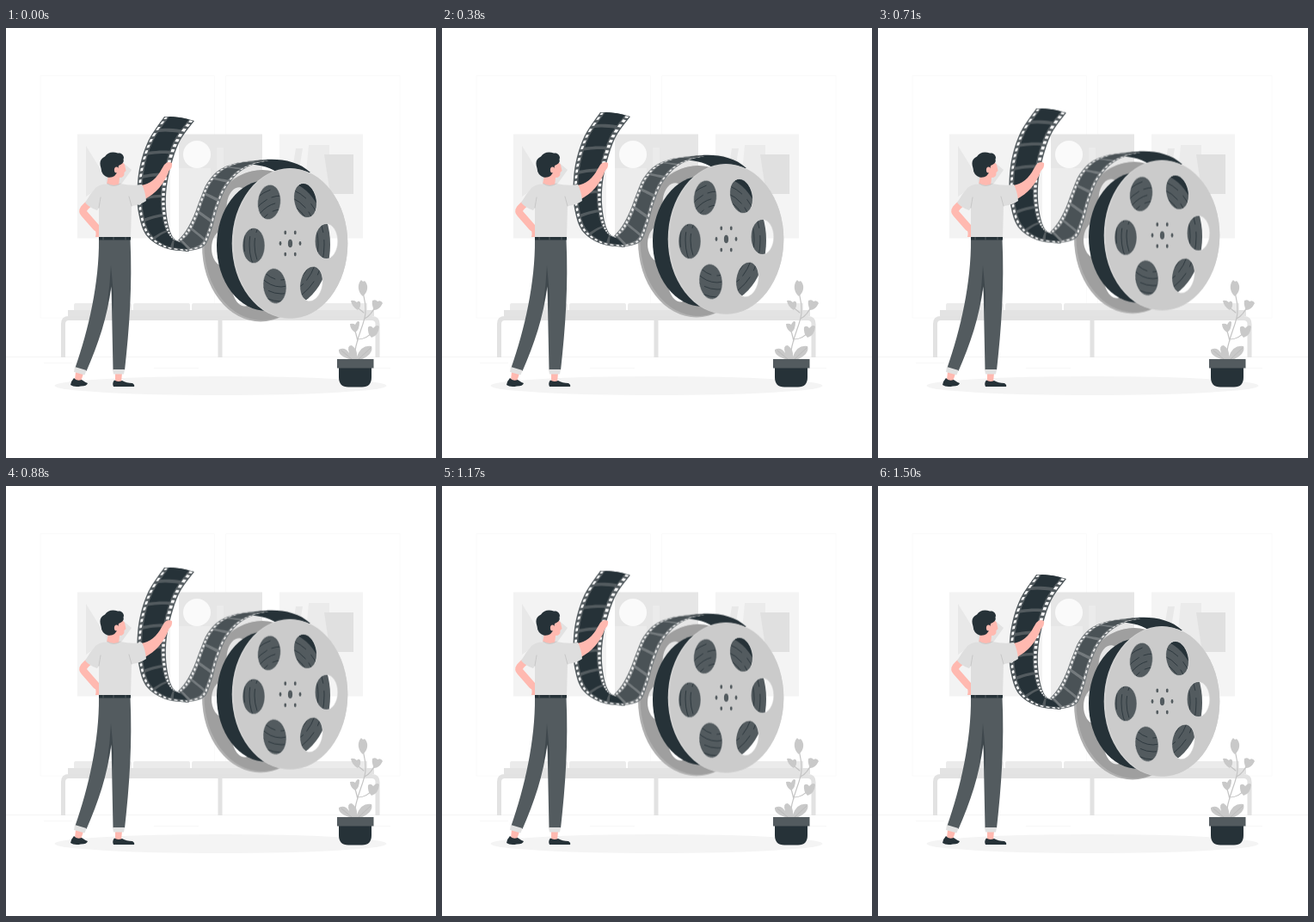
Animation, 500 px wide and 500 px high, one loop 1.54 s. Source, as an HTML page:

```html
<!DOCTYPE html>
<html lang="en">
<head>
<meta charset="utf-8">
<title>Film reel</title>
<style>
  html, body { margin: 0; width: 100%; height: 100%; overflow: hidden; background: #fff; }
  svg { display: block; width: 100vw; height: 100vh; }
  .float { animation: float 1540ms linear infinite; }
  @keyframes float {
    0%, 97.4%, 100% { transform: translateY(0); }
    48.7% { transform: translateY(-10px); }
  }
  .dark { fill: #263238; }
  .slate { fill: #535b5f; }
  .skin { fill: #ffb9b0; }
  .line { fill: none; stroke-linecap: round; stroke-linejoin: round; }
</style>
</head>
<body>
<svg viewBox="0 0 500 500">
  <defs>
    <g id="holes">
      <ellipse cx="306" cy="202.500" rx="13.300" ry="20.300" transform="rotate(6 306 202.5)"/>
      <ellipse cx="348" cy="200.500" rx="13" ry="20.300" transform="rotate(-12 348 200.5)"/>
      <ellipse cx="288" cy="253" rx="13" ry="20.500"/>
      <ellipse cx="372.500" cy="248" rx="13.300" ry="20.500"/>
      <ellipse cx="312.500" cy="300" rx="13.500" ry="20.500" transform="rotate(-6 312.5 300)"/>
      <ellipse cx="355" cy="297.500" rx="13" ry="20.500" transform="rotate(10 355 297.5)"/>
    </g>
    <mask id="backCut">
      <rect width="500" height="500" fill="#fff"/>
      <use href="#holes" x="-36" y="3"/>
    </mask>
    <mask id="frontCut">
      <rect width="500" height="500" fill="#fff"/>
      <use href="#holes"/>
    </mask>
    <mask id="inHoles"><use href="#holes" fill="#fff"/></mask>
  </defs>

  <!-- room -->
  <g fill="none" stroke="#fafafa">
    <path d="M40 55.500H242.500V337H40ZM255.500 55.500H458V337H255.500Z"/>
    <path d="M0 382.500H500" stroke="#f5f5f5"/>
    <path d="M172 395.500H224M44 389.500H77M425 395.500H447" stroke="#f7f7f7"/>
  </g>

  <!-- pictures -->
  <path d="M83 123.500H191V244.500H83Z" fill="#f3f3f3"/>
  <path d="M93 137L119 179L93 196Z" fill="#e8e8e8"/>
  <path d="M113 165L126 148L146 165L133 183L117 181Z" fill="#e2e2e2"/>
  <path d="M201 123.500H298V244.500H201Z" fill="#e6e6e6"/>
  <path d="M201 163H238V244.500H201Z" fill="#ececec"/>
  <path d="M245 139H253V244H245Z" fill="#ebebeb"/>
  <circle cx="222" cy="147" r="16" fill="#fafafa"/>
  <path d="M318 123.500H415V244.500H318Z" fill="#f4f4f4"/>
  <path d="M337 140H345L339 176H331Z" fill="#e8e8e8"/>
  <path d="M352 136H376V200H346Z" fill="#ebebeb"/>
  <path d="M370 147H404V193H377Z" fill="#e0e0e0"/>

  <!-- bench -->
  <path d="M79 328.500V322q0-2 2-2H144q2 0 2 2V328.500ZM148 328.500V322q0-2 2-2H212q2 0 2 2V328.500ZM216 328.500V322q0-2 2-2H420V328.500Z" fill="#ebebeb"/>
  <path d="M72 328H428V335H72Z" fill="#e3e3e3"/>
  <path class="line" d="M66.500 383V344q0-6.500 6.500-6.500H425q7 0 7 6.500V383M249 338V383" stroke="#e2e2e2" stroke-width="5" style="stroke-linecap:butt"/>

  <ellipse cx="249.500" cy="416" rx="193" ry="11" fill="#f4f4f4"/>

  <!-- plant -->
  <g fill="#c9c9c9">
    <path class="line" d="M405 385C405 363 417 346 418 331S415 312 414 302M409 362Q420 362 427 352M417 338Q425 334 430 322M416 331Q411 327 406 323M409 364Q407 356 405 348" stroke="#c4c4c4" stroke-width="1.200"/>
    <path d="M413 293C408 298 409 307 415 312C421 307 422 299 417 294Q415 296 413 293Z"/>
    <path d="M401 317Q405 316 408 319Q410 316 412 319Q413 325 409 328Q402 324 401 317Z"/>
    <path d="M426 317Q430 315 432 318Q436 316 438 320Q434 328 428 328Q425 322 426 317Z"/>
    <path d="M400 344Q404 343 406 345Q409 339 411 342Q411 351 406 354Q400 350 400 344Z"/>
    <path d="M421 348Q424 345 427 349Q431 344 434 347Q433 358 425 360Q420 355 421 348Z"/>
    <path d="M403 386Q386 382 387 374Q394 370 399 378Q396 369 402 369Q409 374 408 382Q413 368 425 370Q428 379 412 386Z"/>
    <path class="line" d="M390 375L402 385M424 372L410 385" stroke="#b5b5b5" stroke-width=".7"/>
  </g>
  <path class="dark" d="M387 394H425V406Q425 417.500 414 417.500H398Q387 417.500 387 406Z"/>
  <path class="slate" d="M385 385H427.500V395.500H385Z"/>

  <!-- film and reel -->
  <g class="float">
    <g mask="url(#backCut)">
      <ellipse cx="296" cy="253.500" rx="68" ry="88" fill="#b0b0b0"/>
      <ellipse cx="298" cy="252.500" rx="67.500" ry="87.500" fill="#9f9f9f"/>
    </g>
    <path class="dark" d="M303 177A58 76 0 0 0 303 329H328V177Z"/>
    <path class="dark" d="M278 158C296 151 333 148 354 168L318 170Q306 159 278 158Z"/>
    <g id="film"></g>
    <g mask="url(#inHoles)">
      <ellipse cx="320" cy="252" rx="57" ry="75" class="slate"/>
      <g class="line" stroke="#263238" stroke-width=".8">
        <ellipse cx="320" cy="252" rx="50" ry="66" stroke-dasharray="36 9"/>
        <ellipse cx="320" cy="252" rx="43" ry="57" stroke-dasharray="19 6"/>
        <ellipse cx="320" cy="252" rx="37" ry="49" stroke-dasharray="43 8"/>
        <ellipse cx="320" cy="252" rx="31" ry="41" stroke-dasharray="25 7"/>
      </g>
      <path class="dark" d="M334 170H366V214Q355 188 334 180Z"/>
    </g>
    <g mask="url(#frontCut)">
      <ellipse cx="330" cy="250.500" rx="67.300" ry="87.500" fill="#d2d2d2"/>
      <ellipse cx="331" cy="250.500" rx="66.300" ry="87" fill="#cbcbcb"/>
    </g>
    <use href="#holes" fill="none" stroke="#d2d2d2" stroke-width=".6"/>
    <g class="slate">
      <ellipse cx="330.500" cy="250.500" rx="2.600" ry="4.800"/>
      <g id="bolts"></g>
    </g>
  </g>

  <!-- person -->
  <path class="line" d="M99 202C92 208 87 212 91 216Q98 224 105 232" stroke="#ffb9b0" stroke-width="8.500"/>
  <path class="skin" d="M101 226Q110 229 110 236L108 243H104Q106 236 101 232Z"/>
  <path class="skin" d="M157 183C167 182 176 174 181 164L184 159Q188 154 193 157Q194 162 189.500 166C184 181 175 192 160 200Z"/>
  <path class="skin" d="M127 157Q135 153 138 159L139.500 166L137.500 168Q138 174 132 174L131 184Q123 188 117 182L120 166Z"/>
  <path class="dark" d="M110.500 163Q107 153 115 149.500Q120 142.500 130 145.500Q138 146 136.500 153Q138 157 131 160L130 166Q127 175 118 173.500Q111 171 110.500 163Z"/>
  <path class="line" d="M130 146.500Q135 144 136.500 151" stroke="#263238" stroke-width="1"/>
  <ellipse class="skin" cx="128.500" cy="165" rx="2.600" ry="3.500"/>
  <path d="M118 181Q108 182 104 186Q97 194 92 203Q97 209 106 212L108 209V243.500H145L146 207Q156 206 163 201Q162 190 158 182Q146 184 133 181Q126 185 118 181Z" fill="#dedede"/>
  <path class="line" d="M118 181Q125 186 133 181M108 209L110 197M146 207L143 196" stroke="#c4c4c4" stroke-width=".9"/>
  <path class="slate" d="M108 246H144.500C147 298 143.500 350 138 398H124.500L122.500 300C118 336 107 368 93.500 399L80.500 395C96 351 108.500 296 108 246Z"/>
  <path d="M122 276L125 310L124.500 330L122.500 300L117.500 322Q121 298 122 276Z" fill="#3f484d"/>
  <path class="dark" d="M108 243H145V246.500H108Z"/>
  <path d="M113 243V246.500M125 243V246.500M139 243V246.500" stroke="#535b5f"/>
  <path class="skin" d="M81 400L90 402L87 411L80 409ZM127 401H135L134 412H127Z"/>
  <path d="M80 394L93.500 398L91.500 403.500L79 400ZM124 397H138L137 402.500H125Z" fill="#e1e1e1"/>
  <path class="dark" d="M79 407Q82 411 88 409Q92 412 95 413Q94 416.500 87 416.500Q79 418 75 415Q76 410 79 407ZM126 409.500Q130 412 135 410Q140 413 147 413Q150 415 149 417H125Q123 413 126 409.500Z"/>
</svg>

<script>
  const $ = id => document.getElementById(id);

  // Smooth curve through evenly spaced points, u from 0 to 1
  const curve = pts => u => {
    const n = pts.length - 1;
    const i = Math.min(n - 1, Math.floor(u * n)), t = u * n - i;
    const at = k => pts[Math.max(0, Math.min(n, k))];
    return [0, 1].map(c => {
      const [a, b, d, e] = [at(i - 1)[c], at(i)[c], at(i + 1)[c], at(i + 2)[c]];
      return b + t / 2 * (d - a + t * (2 * a - 5 * b + 4 * d - e + t * (3 * (b - d) + e - a)));
    });
  };

  // Patch of the ribbon between two edges; bow lifts its middle
  function patch(left, right, bow, u0, u1, v0, v1) {
    const point = (u, v) => {
      const a = left(u), b = right(u);
      const x = a[0] + (b[0] - a[0]) * v;
      const y = a[1] + (b[1] - a[1]) * v - 4 * bow * v * (1 - v);
      return x.toFixed(2) + " " + y.toFixed(2);
    };
    const steps = Math.max(2, Math.ceil((u1 - u0) * 48));
    const pts = [];
    const walk = f => { for (let k = 0; k < steps; k++) pts.push(f(k / steps)); };
    const mix = (a, b, t) => a + (b - a) * t;
    walk(t => point(mix(u0, u1, t), v0));
    walk(t => point(u1, mix(v0, v1, t)));
    walk(t => point(mix(u1, u0, t), v1));
    walk(t => point(u0, mix(v1, v0, t)));
    return "M" + pts.join("L") + "Z";
  }

  function strip(l, r, { base, cell, hole, cells, start, holes, bow }) {
    const left = curve(l), right = curve(r);
    const part = (...range) => patch(left, right, bow, ...range);
    const path = (fill, d) => `<path fill="${fill}" d="${d}"/>`;
    let frames = "", perfs = "";
    for (let i = -1; i < cells; i++) {
      const u0 = Math.max(0, (i + start + .07) / cells);
      const u1 = Math.min(1, (i + start + .93) / cells);
      if (u1 > u0) frames += part(u0, u1, .17, .82);
    }
    for (let i = 0; i < holes; i++) {
      const u0 = (i + .22) / holes, u1 = (i + .76) / holes;
      perfs += part(u0, u1, .045, .125) + part(u0, u1, .86, .96);
    }
    return path(base, part(0, 1, 0, 1)) + path(cell, frames) + path(hole, perfs);
  }

  const rise = strip(
    [[209, 260], [230, 254], [239, 235], [246, 210], [256, 186], [271, 168], [288, 158.500], [306, 154]],
    [[199, 248], [209, 236], [218, 219], [226, 198], [234, 180], [248, 165], [268, 157], [294, 153.500]],
    { base: "#747a7d", cell: "#4a5256", hole: "#ececec", cells: 7, start: .35, holes: 27, bow: 0 });

  const fall = strip(
    [[184, 103], [166, 130], [156, 159], [152.500, 188], [154, 215], [163, 241], [185, 256], [213, 260]],
    [[219, 108], [203, 130], [193, 156], [187, 184], [186, 208], [189, 230], [194, 243], [200, 248]],
    { base: "#535b5f", cell: "#263238", hole: "#fff", cells: 7.5, start: .7, holes: 30, bow: 1.5 });

  $("film").innerHTML = rise + fall;

  $("bolts").innerHTML = Array.from({ length: 6 }, (_, i) => {
    const a = i * Math.PI / 3;
    return `<ellipse cx="${330.5 + 11.5 * Math.cos(a)}" cy="${250.5 + 14.5 * Math.sin(a)}" rx="1.4" ry="2.4"/>`;
  }).join("");
</script>
</body>
</html>
```
